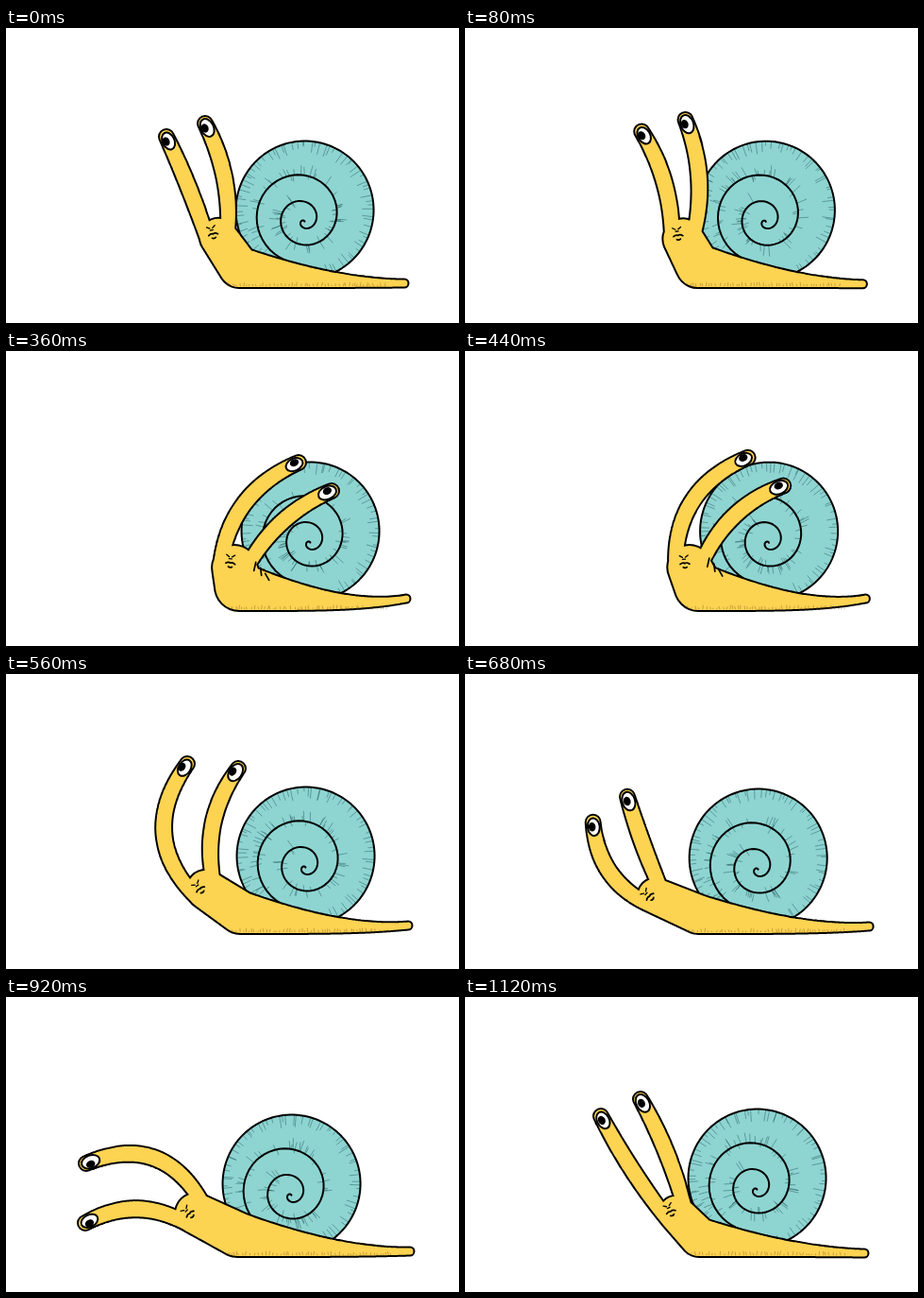
Animation of 480x312 px, one loop 1200 ms. Source, as an HTML page with a canvas:

```html
<!DOCTYPE html>
<html lang="en">
<head>
<meta charset="utf-8">
<title>Snail</title>
<style>
  html, body { margin: 0; width: 100%; height: 100%; overflow: hidden; background: #fff; }
  canvas { display: block; width: 480px; height: 312px; }
</style>
</head>
<body>
<canvas id="stage"></canvas>
<script>
const W = 480, H = 312, LOOP = 1200, TICK = 40;
const INK = '#000', SKIN = '#fdd352', SHELL = '#8ed5d2';
const GROUND = 275, SHELL_R = 73, TAIL_R = 4.5, STALK_R = 8;
const TAU = Math.PI * 2;

const canvas = document.getElementById('stage');
const ctx = canvas.getContext('2d');
const ratio = window.devicePixelRatio || 1;
canvas.width = W * ratio;
canvas.height = H * ratio;

// near and far: tip of the eye stalk and how far it bows sideways
const poses = [
  { at: 0, belly: [247, 253], neck: [225, 221], tail: [422, 270], shell: [315, 191],
    near: [170, 115, 2], far: [211, 101, 8], gaze: [-2.5, 0.5] },
  { at: 200, belly: [246, 249], neck: [241, 228], tail: [421, 271], shell: [320, 191],
    near: [222, 104, 16], far: [275, 98, 9], gaze: [-2, -1] },
  { at: 360, belly: [247, 249], neck: [242, 229], tail: [424, 262], shell: [321, 189],
    near: [310, 118, -21], far: [345, 148, -10], gaze: [0, -2] },
  { at: 560, belly: [248, 252], neck: [212, 228], tail: [426, 266], shell: [316, 191],
    near: [192, 95, -31], far: [246, 100, -13], gaze: [-3, -1] },
  { at: 760, belly: [245, 256], neck: [192, 244], tail: [431, 268], shell: [299, 196],
    near: [67, 261, 12], far: [70, 187, 19], gaze: [1, 1.5] },
  { at: 920, belly: [245, 251], neck: [201, 229], tail: [428, 269], shell: [301, 196],
    near: [84, 239, 16], far: [85, 176, 28], gaze: [0, 2.5] },
  { at: 1120, belly: [248, 254], neck: [224, 229], tail: [423, 271], shell: [308, 190],
    near: [144, 126, -3], far: [186, 108, 4], gaze: [-1.5, 0] }
];
// how many ticks each drawing is held
const holds = [2, 2, 1, 2, 2, 1, 2, 1, 1, 2, 2, 1, 2, 2, 3, 2, 2];

function randomizer(seed) {
  let s = seed * 7919 + 17;
  return () => (s = (s * 16807) % 2147483647) / 2147483647;
}

// Catmull-Rom blend through neighbouring poses
function poseAt(time) {
  const n = poses.length, i = poses.filter(p => p.at <= time).length - 1;
  const [a, b, c, d] = [-1, 0, 1, 2].map(k => poses[(i + k + n) % n]);
  const u = (time - b.at) / ((c.at || LOOP) - b.at);
  const mix = (p, q, r, s) => q + 0.5 * u * (r - p + u * (2 * p - 5 * q + 4 * r - s + u * (3 * (q - r) + s - p)));
  const pose = {};
  for (const key of Object.keys(b).slice(1)) {
    pose[key] = b[key].map((v, j) => mix(a[key][j], v, c[key][j], d[key][j]));
  }
  return pose;
}

function unit(from, to) {
  const dx = to[0] - from[0], dy = to[1] - from[1], len = Math.hypot(dx, dy) || 1;
  return [dx / len, dy / len];
}

// point beside p: ahead along dir, and to the right of it
const beside = (p, dir, ahead, right) =>
  [p[0] + dir[0] * ahead - dir[1] * right, p[1] + dir[1] * ahead + dir[0] * right];

// a limb is a string of round beads: [x, y, radius] for u from 0 to 1
const limb = (bead, count = 120) => Array.from({ length: count + 1 }, (_, i) => bead(i / count));

function outline(beads, grow) {
  const path = new Path2D();
  for (const [x, y, r] of beads) {
    path.moveTo(x + r + grow, y);
    path.arc(x, y, r + grow, 0, TAU);
  }
  return path;
}

function fill(path, color) {
  ctx.fillStyle = color;
  ctx.fill(path);
}

function pen(path, width, color = INK) {
  ctx.lineWidth = width;
  ctx.strokeStyle = color;
  ctx.stroke(path);
}

function dash(path, x, y, dx, dy) {
  path.moveTo(x, y);
  path.lineTo(x + dx, y + dy);
}

function trace(points) {
  const path = new Path2D();
  points.forEach(p => path.lineTo(p[0], p[1]));
  return path;
}

function drawShell([x, y], rnd) {
  const rim = a => {
    const r = SHELL_R * (1 + 0.03 * Math.cos(a - Math.PI / 4));
    return [x + r * Math.cos(a), y + r * Math.sin(a)];
  };
  const coil = turn => {
    const r = 52 * (1 - turn / 2.4) ** 1.2, a = (turn + 0.355) * TAU;
    return [x + 1.5 + r * (Math.cos(a) - 0.05), y + 14 + r * (Math.sin(a) - 0.18)];
  };
  const edge = trace(limb(u => rim(u * TAU)));
  fill(edge, SHELL);

  const hatch = new Path2D();
  for (let i = 0; i < 80; i++) {
    const a = (i + rnd()) / 80 * TAU, len = 4 + rnd() * 9;
    dash(hatch, ...rim(a), -Math.cos(a) * len, -Math.sin(a) * len);
  }
  for (let i = 0; i < 75; i++) {
    const turn = rnd() * 1.3, a = (turn + 0.355 + (rnd() - 0.5) * 0.05) * TAU;
    const len = rnd() < 0.7 ? 4 + rnd() * 8 : -3 - rnd() * 4;
    dash(hatch, ...coil(turn), Math.cos(a) * len, Math.sin(a) * len);
  }
  pen(hatch, 0.6, 'rgba(20,70,72,0.7)');
  pen(trace(limb(u => coil(u * 2.42 - 0.05))), 2);
  pen(edge, 2);
}

// foot lying on the ground, thickening from tail to belly
function footBeads({ belly, tail }) {
  const girth = GROUND - belly[1], lift = GROUND - TAIL_R - tail[1];
  return limb(u => {
    const r = TAIL_R + (girth - TAIL_R) * (1 - u) ** 1.7;
    return [belly[0] + (tail[0] - belly[0]) * u, GROUND - r - lift * u ** 4, r];
  });
}

function stalkBeads(base, [x, y, bow]) {
  const dir = unit(base, [x, y]);
  return limb(u => {
    const swell = 4 * u * (1 - u);
    const p = [base[0] + (x - base[0]) * u, base[1] + (y - base[1]) * u];
    return [...beside(p, dir, 0, bow * swell), STALK_R + swell];
  });
}

function drawEye(stalk, gaze, size) {
  const tip = stalk[stalk.length - 1], dir = unit(stalk[stalk.length - 12], tip);
  const [x, y] = beside(tip, dir, -5, 0);
  const turn = Math.atan2(dir[0], -dir[1]);
  const white = new Path2D(), pupil = new Path2D();
  white.ellipse(x, y, 6.4 * size, 9.4 * size, turn, 0, TAU);
  pupil.ellipse(x + gaze[0], y + gaze[1], 3.8, 4.8, turn, 0, TAU);
  fill(white, '#fff');
  ctx.save();
  ctx.clip(white);
  fill(pupil, INK);
  ctx.restore();
  pen(white, 2);
}

function drawFace([x, y], turn) {
  ctx.save();
  ctx.translate(x, y);
  ctx.rotate(turn);
  pen(new Path2D('M-5 -6L-2 -4M4 -6L1 -4M-2 -2L1 -2'), 1.3);
  pen(new Path2D('M-5 3Q-2 1 0 2.5Q2 1 5 3.5M-2 6.5Q0 8 2 6.5'), 1.7);
  ctx.restore();
}

function drawBody(pose, rnd) {
  const { belly, neck, tail, near, far, gaze } = pose;
  const girth = GROUND - belly[1], dir = unit(belly, neck), spread = girth * 0.92 - STALK_R;
  const chest = limb(u => [
    belly[0] + (neck[0] - belly[0]) * u, belly[1] + (neck[1] - belly[1]) * u, girth * (1 - 0.08 * u)
  ]);
  const nearStalk = stalkBeads(beside(neck, dir, 0, -spread), near);
  const farStalk = stalkBeads(beside(neck, dir, 0, spread), far);
  const beads = [...footBeads(pose), ...chest, ...nearStalk, ...farStalk];
  fill(outline(beads, 1), INK);
  fill(outline(beads, -1), SKIN);

  const hatch = new Path2D();
  for (let x = belly[0] - 12; x < tail[0] - 20; x += 2 + rnd() * 3) {
    dash(hatch, x, GROUND - 2, rnd() * 2 - 1, -1 - rnd() * 3);
  }
  pen(hatch, 0.6, 'rgba(120,84,20,0.65)');

  if (girth > 24.5) {
    const fold = new Path2D(), [x, y] = beside(neck, dir, 0, girth * 0.9);
    for (let i = 0; i < 3; i++) dash(fold, x + i * 5, y + i * 6, i * 3 - 2, 9 - i);
    pen(fold, 1.7);
  }
  drawEye(nearStalk, gaze, 1);
  drawEye(farStalk, gaze, 1.06);
  drawFace(beside(neck, dir, 8, -2), Math.atan2(dir[0], -dir[1]) + 0.35);
}

function draw(time) {
  const pose = poseAt(time), rnd = randomizer(time / TICK + 1);
  ctx.setTransform(ratio, 0, 0, ratio, 0, 0);
  ctx.fillStyle = '#fff';
  ctx.fillRect(0, 0, W, H);
  ctx.lineCap = ctx.lineJoin = 'round';
  drawShell(pose.shell, rnd);
  drawBody(pose, rnd);
}

let total = 0;
const times = holds.map(n => (total += n * TICK) - n * TICK);
const start = performance.now();
let shown = -1;
function play() {
  const now = (performance.now() - start) % LOOP;
  const time = times.filter(t => t <= now).pop();
  if (time !== shown) draw(shown = time);
  requestAnimationFrame(play);
}
play();
</script>
</body>
</html>
```
